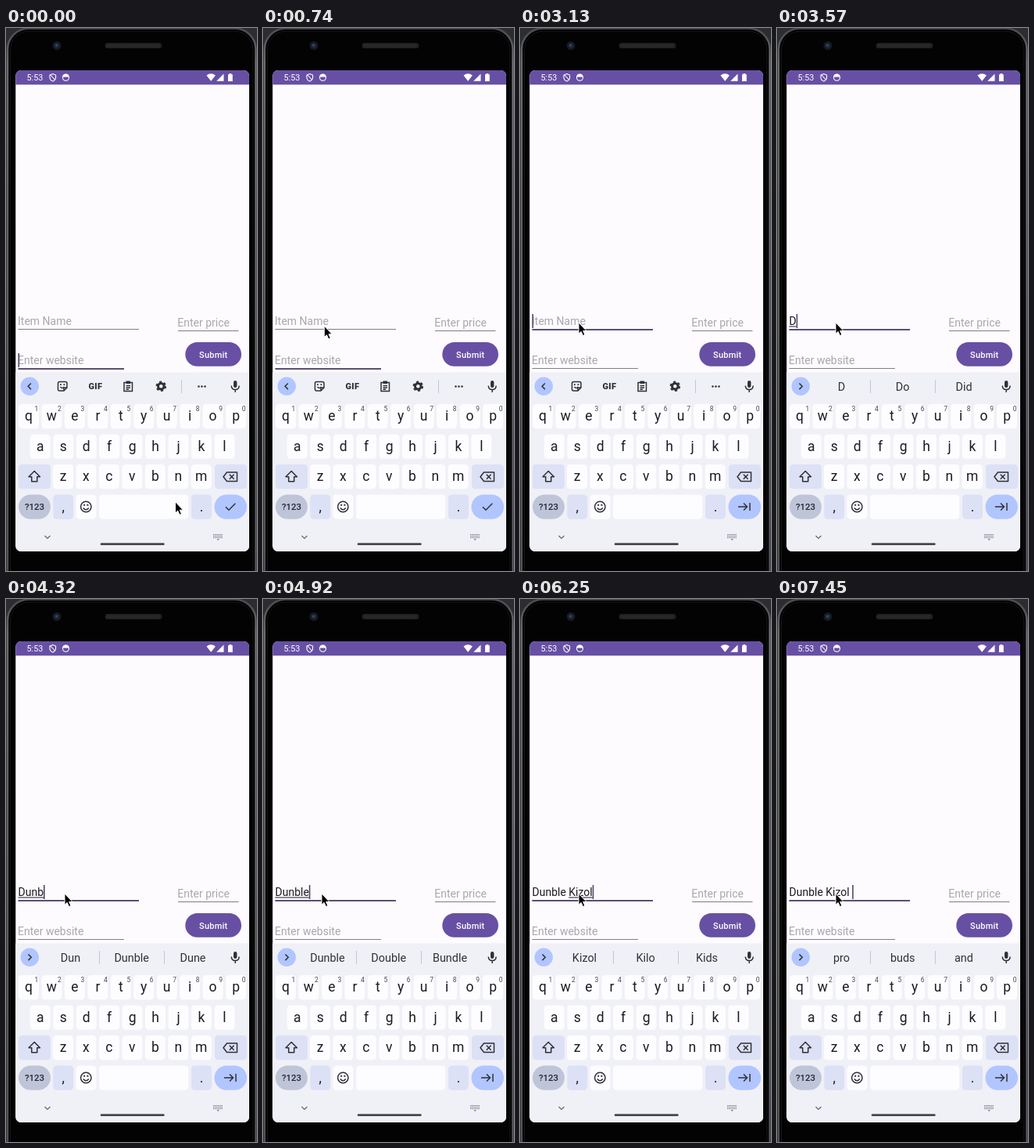
Recreate the animation shown at these times as an HTML page. Size 321x693 px, loop 8 s.

```html
<!DOCTYPE html>
<html lang="en">
<head>
<meta charset="utf-8">
<title>Item form</title>
<style>
  html, body { margin: 0; width: 100%; height: 100%; overflow: hidden; background: #2c2d30; }
  svg { display: block; width: 100vw; height: 100vh; }
  text { font-family: Roboto, "Open Sans", sans-serif; white-space: pre; }
  .mid { text-anchor: middle; }
  .field { font-size: 14px; }
  .hint { fill: #a9a7ac; }
  .key { font-size: 17.5px; fill: #1c1c20; }
  .num { font-size: 8.5px; fill: #45464f; }
  .sug { font-size: 14.4px; fill: #303137; }
  .ico { fill: none; stroke: #303137; stroke-width: 1.5; }
  .sys { fill: none; stroke: #fff; stroke-width: 1.1; }
</style>
</head>
<body>
<svg viewBox="0 0 321 693" preserveAspectRatio="none">
  <defs>
    <clipPath id="screen"><rect x="12.3" y="54" width="298.700" height="614" rx="7"/></clipPath>
    <linearGradient id="rim" x2="0" y2="1">
      <stop offset="0" stop-color="#4a4b4e"/><stop offset=".06" stop-color="#6a6b6f"/><stop offset="1" stop-color="#505154"/>
    </linearGradient>
  </defs>

  <!-- phone body -->
  <rect width="321" height="693" fill="#2c2d30"/>
  <rect x="2" y=".5" width="317.500" height="740" rx="27" fill="#000" stroke="url(#rim)" stroke-width="2.600"/>
  <rect x="5.500" y="4" width="310.500" height="740" rx="24" fill="#030304" stroke="#17181a"/>
  <circle cx="65" cy="22.500" r="5.500" fill="#17191f"/>
  <circle cx="65" cy="22.500" r="3" fill="#202a42"/>
  <circle cx="64.500" cy="22" r="1.200" fill="#43517a"/>
  <rect x="126.500" y="19" width="73" height="7" rx="3.500" fill="#202022"/>
  <path d="M129 22.500h68" stroke="#303032" stroke-width="4" stroke-dasharray="1 1"/>

  <g clip-path="url(#screen)">
    <rect x="12" y="54" width="300" height="615" fill="#fefbff"/>
    <rect x="12" y="54" width="300" height="18.300" fill="#6750a4"/>
    <text x="26.500" y="67.300" font-size="10.8" fill="#fff">5:53</text>
    <path class="sys" d="M59.800 58.500l3.800 1.500v3q0 3.500 -3.800 5q-3.800 -1.500 -3.800 -5v-3zM57 60l5.500 6"/>
    <circle class="sys" cx="76.500" cy="63.300" r="4"/>
    <path d="M72.500 62.500a4 4 0 0 1 8 0z" fill="#fff"/>
    <path d="M256.500 60.500q5.700 -4.500 11.400 0l-5.700 7.300zM278.500 58.500v9.300h-9.300z" fill="#fff"/>
    <path d="M284 59.300h1.500v-1.300h2.800v1.300h1.500v8.700h-5.800z" fill="#fff"/>

    <!-- form -->
    <text id="hint" class="field hint" x="15" y="379">Item Name</text>
    <text id="item" class="field" x="15.500" y="379" fill="#1c1b1f"></text>
    <rect id="compose" y="380.500" height="1" fill="#1c1b1f"/>
    <rect id="itemLine" x="15.500" y="384" width="154.500"/>
    <text class="field hint" x="219.300" y="381.300">Enter price</text>
    <rect x="220" y="386" width="77.500" height="1" fill="#807d84"/>
    <text class="field hint" x="15" y="428.500">Enter website</text>
    <rect id="webLine" x="15.500" y="434" width="135.500"/>
    <rect id="caret" width="1.600" height="18" fill="#51476b"/>
    <rect x="229.300" y="401" width="71.700" height="30.800" rx="15.400" fill="#6750a4"/>
    <text class="mid" x="265.200" y="420.700" font-size="11" font-weight="500" letter-spacing=".2" fill="#fff">Submit</text>

    <!-- keyboard -->
    <rect x="12" y="439.500" width="300" height="230" fill="#f0f0f7"/>
    <circle cx="30.300" cy="457.300" r="11.700" fill="#b1c5ff"/>
    <path id="chev" class="ico"/>
    <g id="tools">
      <path class="ico" d="M68.500 451.500h7.500q2 0 2 2v5.500l-4 4h-5.500q-2 0 -2 -2v-7.500q0 -2 2 -2zM69.500 458q2.500 3 5 0M78 459h-4v4"/>
      <path d="M69 454.200h1.800v1.800h-1.800zM73.500 454.200h1.800v1.800h-1.800z" fill="#303137"/>
      <text class="mid" x="114.500" y="461.300" font-size="11" font-weight="800" letter-spacing=".4" fill="#303137">GIF</text>
      <path class="ico" d="M151 452.500h10.500v11h-10.500zM153.500 456.500h5.500M153.500 459h5.500M153.500 461.300h3.500"/>
      <path d="M153.500 450.500h5.500v3.500h-5.500z" fill="#303137"/>
      <circle class="ico" cx="198.300" cy="457.300" r="3.800" style="stroke-width:3"/>
      <circle class="ico" cx="198.300" cy="457.300" r="5.700" style="stroke-width:2.200" stroke-dasharray="2.985 2.985"/>
      <path d="M224.500 449v17" stroke="#c6c6cf"/>
      <path d="M246.500 457.500h.01M250.500 457.500h.01M254.500 457.500h.01" stroke="#303137" stroke-width="2.600" stroke-linecap="round"/>
    </g>
    <g id="words">
      <path d="M119.500 449v17M202.500 449v17" stroke="#c6c6cf"/>
      <text class="sug mid" x="82.500" y="463"></text>
      <text class="sug mid" x="160.700" y="463"></text>
      <text class="sug mid" x="239" y="463"></text>
    </g>
    <rect x="291" y="450" width="4.400" height="9" rx="2.200" fill="#303137"/>
    <path class="ico" d="M288.300 456.500q0 5 4.900 5t4.900 -5M293.200 461.500v3.500"/>
    <g id="keys"></g>
    <path class="ico" d="M36.300 565.500l7.200 7.300h-3.700v6h-7v-6h-3.700z" stroke-linejoin="round"/>
    <path class="ico" d="M282.500 567h13v11.500h-13l-4.500 -5.750zM285.800 569.800l5.800 5.900M291.600 569.800l-5.800 5.900" stroke-linejoin="round"/>
    <text class="mid" x="36.500" y="615.300" font-size="11.500" font-weight="500" fill="#24262e">?123</text>
    <circle class="ico" cx="102.300" cy="611" r="6.700"/>
    <path class="ico" d="M98.800 612.500q3.500 4.500 7 0"/>
    <path d="M99.200 607.800h2v2h-2zM103.400 607.800h2v2h-2z" fill="#303137"/>
    <path id="action" class="ico"/>
    <path class="ico" d="M49.500 648l3.500 3.500l3.500 -3.500" style="stroke:#66676f;stroke-width:1.200"/>
    <path d="M265 646.500h12M265 648.500h12M265 650.500h12" stroke="#6a6b73" stroke-width="1.100" stroke-dasharray="1.300 .8"/>
    <path d="M269.500 652.300l1.700 1.700l1.700 -1.700z" fill="#6a6b73"/>
    <rect x="120.700" y="657.300" width="82" height="2.700" rx="1.350" fill="#47474d"/>
  </g>
  <path id="mouse" d="M0 0V14.300L3.200 11.400L5.500 16.600L8 15.500L5.700 10.500H10Z" fill="#000" stroke="#fff" stroke-linejoin="round"/>
</svg>
<script>
const $ = id => document.getElementById(id);
const LOOP = 8000;

// keyboard layout
let keys = '';
const cap = (x, y, w, fill = '#fdfcff', r = 4.5) =>
  keys += `<rect x="${x}" y="${y}" width="${w}" height="31.300" rx="${r}" fill="${fill}"/>`;
const label = (x, y, s, cls = 'key') => keys += `<text class="${cls} mid" x="${x}" y="${y}">${s}</text>`;
[['qwertyuiop', 29], ['asdfghjkl', 43.8], ['zxcvbnm', 73]].forEach(([row, x0], r) => {
  [...row].forEach((ch, i) => {
    const x = x0 + i * 29.45, y = 480 + r * 38.5;
    cap(x - 13, y, 26);
    label(x, y + 21.3, ch);
    if (!r) label(x + 10, y + 9, (i + 1) % 10, 'num');
  });
});
cap(16, 557, 41, '#dce1f6');
cap(267, 557, 41, '#dce1f6');
cap(16, 595.5, 41, '#bfc5d9', 15.6);
cap(60.3, 595.5, 25.8, '#dce1f6');
cap(89.5, 595.5, 26);
cap(119, 595.5, 114.3);
cap(237, 595.5, 26, '#dce1f6');
cap(266.5, 595.5, 41.5, '#b1c5ff', 15.6);
label(73.2, 617, ',');
label(250, 617, '.');
$('keys').innerHTML = keys;

// each step holds until the next; values carry over
const steps = [
  { t: 0, x: 216.5, y: 604.7, focus: 'web', caret: 1, tab: 0, text: '', word: 0, sug: '' },
  { t: 150, x: 200, y: 577 },
  { t: 300, x: 155, y: 503 },
  { t: 450, x: 109, y: 429 },
  { t: 590, x: 85, y: 391 },
  { t: 740, x: 78.3, y: 380.3, caret: 0 },
  { t: 1190, x: 77.8, y: 379.6, caret: 1 },
  { t: 1340, x: 76.8, y: 378.2, focus: 'item' },
  { t: 1490, x: 75.7, y: 376.8, tab: 1 },
  { t: 1640, x: 75, y: 376 },
  { t: 1780, caret: 0 },
  { t: 2080, caret: 1 },
  { t: 2530, caret: 0 },
  { t: 3130, caret: 1 },
  { t: 3420, text: 'D' },
  { t: 3570, sug: 'D Do Did' },
  { t: 4020, text: 'Du', sug: 'D Do During' },
  { t: 4170, text: 'Dun', sug: 'Du Due During' },
  { t: 4320, text: 'Dunb', sug: 'Dun Dunble Dune' },
  { t: 4470, sug: 'Dunb Dunble Dumb' },
  { t: 4620, text: 'Dunbl', sug: 'Dunbl Dunble Double' },
  { t: 4920, text: 'Dunble', sug: 'Dunble Double Bundle' },
  { t: 5210, text: 'Dunble ', word: 7, sug: 'is and the' },
  { t: 5360, text: 'Dunble K', sug: 'K Keep Kind' },
  { t: 5510, text: 'Dunble Ki', sug: 'Ki Kizol Kick' },
  { t: 5660, text: 'Dunble Kiz', sug: 'Kiz Kizol Kids' },
  { t: 5960, text: 'Dunble Kizo', sug: 'Kizo Kizol Kids' },
  { t: 6110, sug: 'Kizo Kizol Kilo' },
  { t: 6250, text: 'Dunble Kizol', sug: 'Kizol Kilo Kids' },
  { t: 6400, text: 'Dunble Kizol ', word: 13, sug: 'pro buds and' },
  { t: 7000, caret: 0 },
  { t: 7450, caret: 1 }
];
for (let i = 1; i < steps.length; i++) steps[i] = { ...steps[i - 1], ...steps[i] };

const pen = document.createElement('canvas').getContext('2d');
const widthOf = s => {
  pen.font = '14px Roboto, "Open Sans", sans-serif';
  return pen.measureText(s).width;
};
const set = (id, attrs) => {
  for (const k in attrs) $(id).setAttribute(k, attrs[k]);
};
const show = (id, on) => $(id).style.display = on ? '' : 'none';
const line = (id, on) => set(id, { height: on ? 2 : 1, fill: on ? '#5a5072' : '#807d84' });

function draw(s) {
  const onItem = s.focus === 'item', end = widthOf(s.text), start = widthOf(s.text.slice(0, s.word));
  set('mouse', { transform: `translate(${s.x} ${s.y})` });
  show('hint', !s.text);
  $('item').textContent = s.text;
  set('compose', { x: 15.5 + start, width: Math.max(0, end - start) });
  line('itemLine', onItem);
  line('webLine', !onItem);
  set('caret', { x: 15.5 + end, y: onItem ? 365 : 415 });
  show('caret', s.caret);
  show('tools', !s.sug);
  show('words', s.sug);
  const words = s.sug.split(' ');
  document.querySelectorAll('.sug').forEach((el, i) => el.textContent = words[i] || '');
  set('chev', { d: s.sug ? 'M28.500 453.500l3.800 3.800l-3.800 3.800' : 'M32 453.500l-3.800 3.800l3.800 3.800' });
  set('action', {
    d: s.tab ? 'M279 611h11M286 606.500l4.500 4.500l-4.500 4.500M294 606v10' : 'M281 611.300l4 4l8.300 -8.500'
  });
}

const began = performance.now();
let last = null;
function tick() {
  const t = (performance.now() - began) % LOOP;
  const s = steps.findLast(k => k.t <= t) || steps[0];
  if (s !== last) draw(last = s);
  requestAnimationFrame(tick);
}
tick();
</script>
</body>
</html>
```
